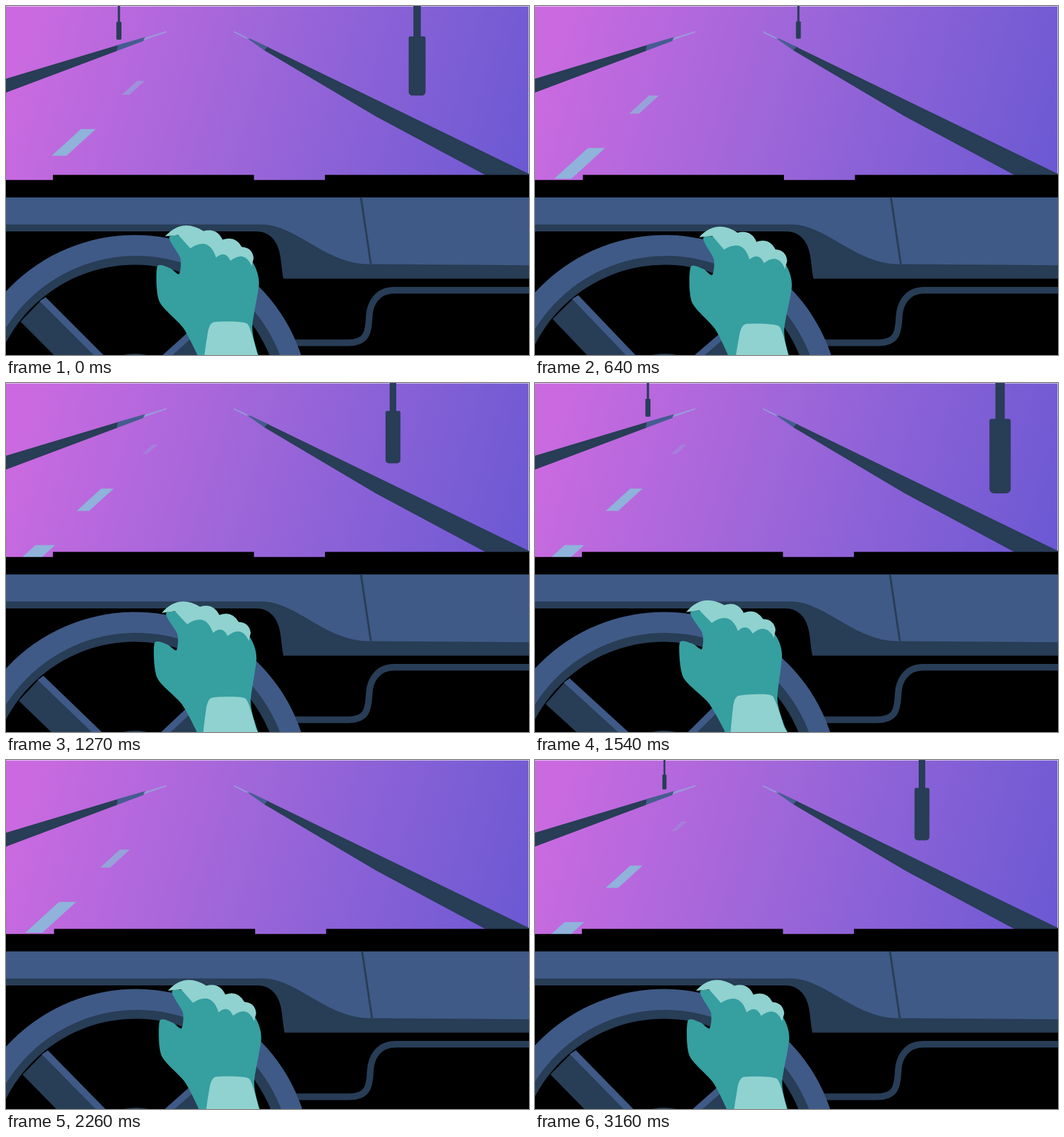
An HTML page with a canvas that plays this animation: 792x528 px, repeating every 3250 ms.

```html
<!DOCTYPE html>
<html lang="en">
<head>
<meta charset="utf-8">
<title>Night drive</title>
<style>
html, body { margin: 0; width: 100%; height: 100%; overflow: hidden; background: #000; }
canvas { display: block; width: 792px; height: 528px; }
</style>
</head>
<body>
<canvas id="stage" width="792" height="528"></canvas>
<script>
const W = 792, LOOP = 3250, STEPS = 36;
const HUB = { x: 195, y: 612.5 };
const ctx = document.getElementById('stage').getContext('2d');
const BLUE = '#3f5a86', DARK = '#283d56', TEAL = '#369fa0', MINT = '#8fd2cf', LANE = '#8fb3da';

const sky = ctx.createLinearGradient(30, 20, 790, 250);
sky.addColorStop(0, '#cb6ae0');
sky.addColorStop(0.45, '#9d66d9');
sky.addColorStop(1, '#6b59d3');

function poly(color, ...p) {
  ctx.fillStyle = color;
  ctx.beginPath();
  for (let i = 0; i < p.length; i += 2) ctx.lineTo(p[i], p[i + 1]);
  ctx.fill();
}

function rect(color, x, y, w, h, r = 0) {
  ctx.fillStyle = color;
  ctx.beginPath();
  ctx.roundRect(x, y, w, h, r);
  ctx.fill();
}

function shape(color, path) {
  ctx.fillStyle = color;
  ctx.fill(path);
}

// Closed smooth curve through [x, y] points
function blob(points, bend = 0.13) {
  const n = points.length, path = new Path2D();
  path.moveTo(...points[0]);
  for (let i = 0; i < n; i++) {
    const [a, b, c, d] = [-1, 0, 1, 2].map(j => points[(i + j + n) % n]);
    path.bezierCurveTo(
      b[0] + (c[0] - a[0]) * bend, b[1] + (c[1] - a[1]) * bend,
      c[0] - (d[0] - b[0]) * bend, c[1] - (d[1] - b[1]) * bend, ...c);
  }
  return path;
}

// Row of arcs; bulge is relative to the length of each one
function scallop(path, points, bulge) {
  path.lineTo(...points[0]);
  for (let i = 1; i < points.length; i++) {
    const [ax, ay] = points[i - 1], [bx, by] = points[i];
    path.quadraticCurveTo(
      (ax + bx) / 2 - (by - ay) * bulge, (ay + by) / 2 + (bx - ax) * bulge, bx, by);
  }
}

// Eased track through [step, value] keys, flat at each turn
function track(keys, k) {
  const n = keys.length - 1;
  const slope = i => (keys[i + 1][1] - keys[i][1]) / (keys[i + 1][0] - keys[i][0]);
  const tangent = i => {
    const a = slope((i + n - 1) % n), b = slope(i % n);
    return a * b > 0 ? 2 * a * b / (a + b) : 0;
  };
  let i = 0;
  while (i < n - 1 && k >= keys[i + 1][0]) i++;
  const [x0, y0] = keys[i], [x1, y1] = keys[i + 1];
  const h = x1 - x0, u = (k - x0) / h, v = 1 - u;
  return v * v * (1 + 2 * u) * y0 + u * u * (3 - 2 * u) * y1
    + h * u * v * (v * tangent(i) - u * tangent(i + 1));
}

const SWAY = [[0, 0], [4, 7], [10, -4], [14, 0], [21, 0], [29, 3.5], [35, 0], [36, 0]];
const STEER = [[0, 0], [4, 1.5], [10, 0.9], [14, -1.1], [21, -3.85], [29, 4.9], [35, 0.6], [36, 0]];

// Lane mark n, counted from the far end
function mark(n) {
  const y = 93 + 19.2 * n + 1.03 * n * n, x = 222 - 1.164 * (y - 93);
  const h = 14.5 + 6.4 * n, run = h * 1.1, w = 8 + 3.6 * n;
  ctx.globalAlpha = Math.min(1, 0.3 + 0.24 * n);
  poly(LANE, x, y, x + w, y, x + w - run, y + h, x - run, y + h);
}

function road(k) {
  ctx.fillStyle = sky;
  ctx.fillRect(0, 0, W, 270);
  ctx.fillStyle = 'rgba(255,255,255,.6)';
  ctx.fillRect(0, 0, W, 1);
  ctx.fillRect(W - 1, 0, 1, 270);

  poly(DARK, 0, 110, 170, 59, 168, 68, 0, 131);
  poly('#465c90', 169, 59, 211, 47, 208, 53, 168, 68);
  poly('#465c90', 364, 48, 369, 49, 399, 63, 391, 67);
  poly(DARK, 396, 62, 800, 258, 732, 259, 560, 167, 391, 67);
  ctx.globalAlpha = 0.65;
  poly(LANE, 210, 48, 243, 38, 243, 40, 208, 52);
  poly(LANE, 345, 38, 370, 50, 363, 49, 345, 40);
  for (let n = (k + 1) % 3; n < 7; n += 3) mark(n);
  ctx.globalAlpha = 1;
}

function lamp(x, top, bottom) {
  const h = bottom - top, w = h * 0.285, pole = w * 0.44;
  rect(DARK, x - pole / 2, 0, pole, top + 2);
  rect(DARK, x - w / 2, top, w, h, [w * 0.1, w * 0.1, w * 0.22, w * 0.22]);
}

// Steps before or after a pass's reference moment, wrapped around the loop
function since(k, ref) {
  const d = (k - ref + STEPS) % STEPS;
  return d > 10 ? d - STEPS : d;
}

function lamps(k) {
  for (const ref of [14, 35]) {
    const s = since(k, ref);
    const d = 35.2 * s + 1.35 * s * s + 0.02 * s ** 3;
    if (s >= -8 && s <= 6) lamp(586 + d, 42.3 + 0.1 * d, 121.5 + 0.385 * d);
  }
  for (const ref of [16, 35]) {
    const s = since(k, ref);
    const d = 23.15 * s + 1.85 * s * s;
    if (s >= -1 && s <= 6) lamp(196 - d, 22.2 + 0.073 * d, 44.4 + 0.265 * d);
  }
}

const PANEL = new Path2D('M-30 280H830V413H420C417 395 417 388 415 377C411 354 398 341.5 378 341.5H2Q-8 342-12 350H-30Z');
const FACE = new Path2D('M-30 290H830V393L700 392 548 391C483 390 440 332 388 331H-30Z');
const PIPE = new Path2D('M830 430.5H588C561 430.5 551 452 550 470C549 495 546 510 518 510H420');
const SEAM = new Path2D('M537.5 290L552.5 391');

function line(path, width) {
  ctx.strokeStyle = DARK;
  ctx.lineWidth = width;
  ctx.stroke(path);
}

function dashboard() {
  rect('#000', -30, 264, 860, 300);
  rect('#000', 71, 256, 304.5, 10);
  rect('#000', 483, 256, 350, 10);
  shape(DARK, PANEL);
  shape(BLUE, FACE);
  rect('#000', -30, 264, 860, 26);
  line(SEAM, 3);
  line(PIPE, 10);
}

const HAND = blob([
  [248, 349], [300, 352], [350, 366], [374, 389], [383, 420], [373, 487], [382, 528], [396, 568],
  [306, 568], [290, 529], [268, 487], [232, 447], [229, 395], [248, 397], [262, 406], [264, 382]
]);
const CUFF = blob([[302, 568], [305, 498], [314, 479], [365, 481], [381, 528], [394, 568]], 0.09);
const FINGERS = new Path2D();
scallop(FINGERS, [[241, 349], [299, 341], [328, 354], [357, 365], [375, 382]], -0.42);
scallop(FINGERS, [[372, 394], [340, 386], [318, 381], [279, 367]], 0.65);
FINGERS.lineTo(261, 347);

function ring(color, outer, inner, dx = 0, dy = 0) {
  ctx.fillStyle = color;
  ctx.beginPath();
  ctx.arc(HUB.x, HUB.y, outer, 0, Math.PI * 2);
  ctx.arc(HUB.x + dx, HUB.y + dy, inner, Math.PI * 2, 0, true);
  ctx.fill();
}

function wheel(angle) {
  ctx.save();
  ctx.translate(HUB.x, HUB.y);
  ctx.rotate(angle * Math.PI / 180);
  ctx.translate(-HUB.x, -HUB.y);
  ring(DARK, 86, 0);
  poly(DARK, 52, 447, 22, 478, 114, 570, 172, 568);
  poly(BLUE, 51, 447, 60, 441, 188, 569, 172, 568);
  poly(DARK, 253, 528, 300, 482, 345, 520, 300, 580, 205, 575);
  poly(BLUE, 194, 568, 238, 528, 300, 472, 306, 480, 253, 528, 209, 570);
  ring(DARK, 240, 220.5);
  ring(BLUE, 265.5, 233, 2, -1);
  shape(TEAL, HAND);
  shape(MINT, FINGERS);
  shape(MINT, CUFF);
  ctx.restore();
}

function draw(ms) {
  const t = ms % LOOP;
  const k = t < 100 ? 0 : Math.min(STEPS - 1, 1 + Math.floor((t - 100) / 90));
  road(k);
  lamps(k);
  ctx.save();
  ctx.translate(track(SWAY, k), k % 11 >= 9 ? -2.5 : -0.5);
  dashboard();
  wheel(track(STEER, k));
  ctx.restore();
}

let start;
function tick(now) {
  start ??= now;
  draw(now - start);
  requestAnimationFrame(tick);
}
draw(0);
requestAnimationFrame(tick);
</script>
</body>
</html>
```
